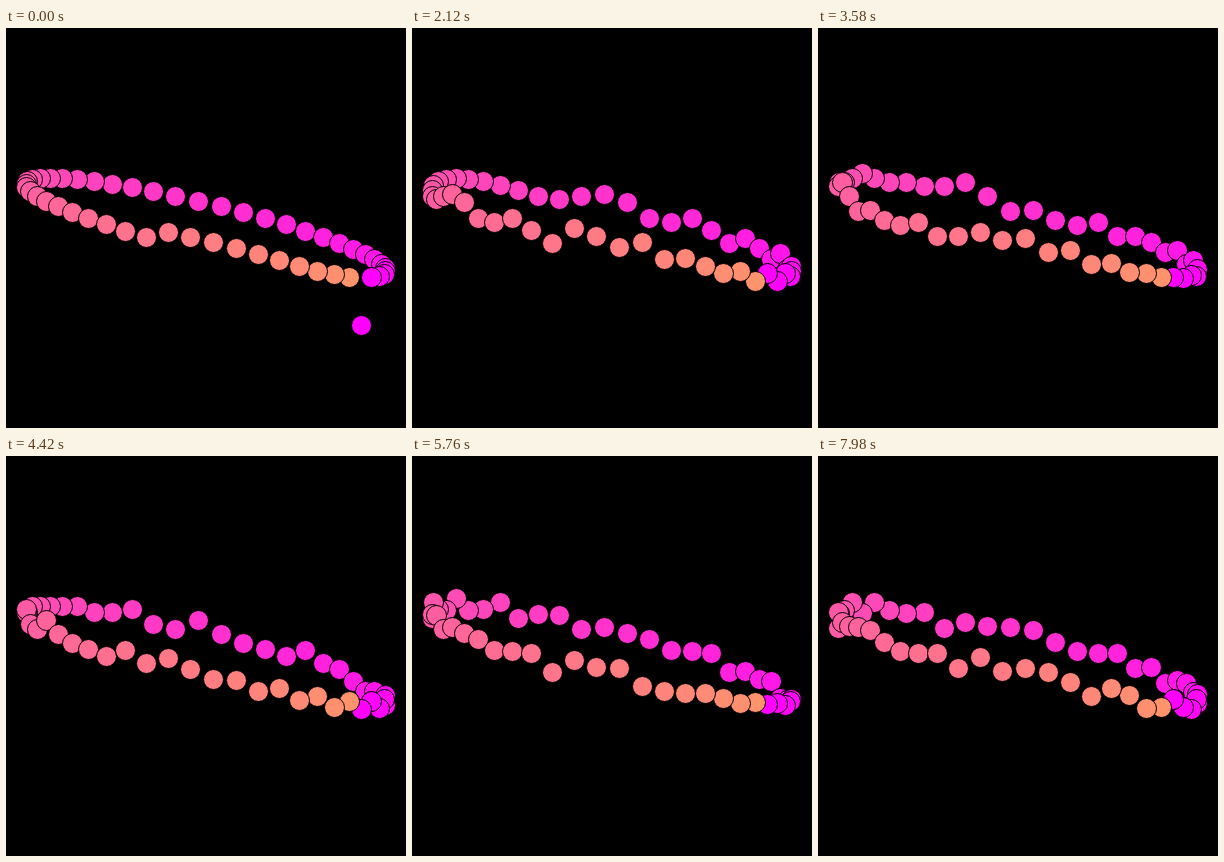
An HTML page with a canvas for the animation above (8000 ms loop, 400 by 400 pixels).

```html
<!DOCTYPE html>
<html lang="en">
<head>
<meta charset="utf-8">
<title>Ring of beads</title>
<style>
  html, body { margin: 0; width: 100%; height: 100%; overflow: hidden; background: #000; }
  canvas { display: block; }
</style>
</head>
<body>
<canvas id="stage" width="400" height="400"></canvas>
<script>
const ctx = document.getElementById('stage').getContext('2d');
const COUNT = 50, LOOP = 8000, FRAME = 20;
const KICK = 47.5;  // first bead's starting offset in px
const SPEED = 0.02; // highest ring frequency, rad per ms
const TAU = Math.PI * 2;

// Resting place of each bead; the last ten follow a squared cosine.
// The ring is seen at a tilt, so beads are painted from back to front.
const beads = Array.from({ length: COUNT }, (_, i) => {
  const angle = TAU * i / COUNT, c = Math.cos(angle);
  const turn = Math.PI / 6 - angle;
  return {
    i,
    x: 200 + 180 * Math.cos(turn),
    y: 200 + 50 * (i >= 40 ? c * c : c),
    depth: Math.sin(turn),
    color: `rgb(255, ${3 * i}, ${255 - 3 * i})`
  };
}).sort((a, b) => a.depth - b.depth);

// Beads joined by springs: sum of the ring's normal modes
function offset(i, t) {
  let sum = 0;
  for (let m = 0; m < COUNT; m++) {
    sum += Math.cos(SPEED * t * Math.sin(Math.PI * m / COUNT)) * Math.cos(TAU * m * i / COUNT);
  }
  return KICK * sum / COUNT;
}

// Beads sit on whole pixels
const snap = v => Math.floor(v) + 0.5;

function draw(t) {
  ctx.fillStyle = '#000';
  ctx.fillRect(0, 0, 400, 400);
  ctx.strokeStyle = '#000';
  ctx.lineWidth = 1;
  for (const { i, x, y, color } of beads) {
    ctx.beginPath();
    ctx.arc(snap(x), snap(y + offset(i, t)), 10, 0, TAU);
    ctx.fillStyle = color;
    ctx.fill();
    ctx.stroke();
  }
}

const start = performance.now();
function tick() {
  const t = (performance.now() - start) % LOOP;
  draw(Math.floor(t / FRAME) * FRAME);
  requestAnimationFrame(tick);
}
tick();
</script>
</body>
</html>
```
